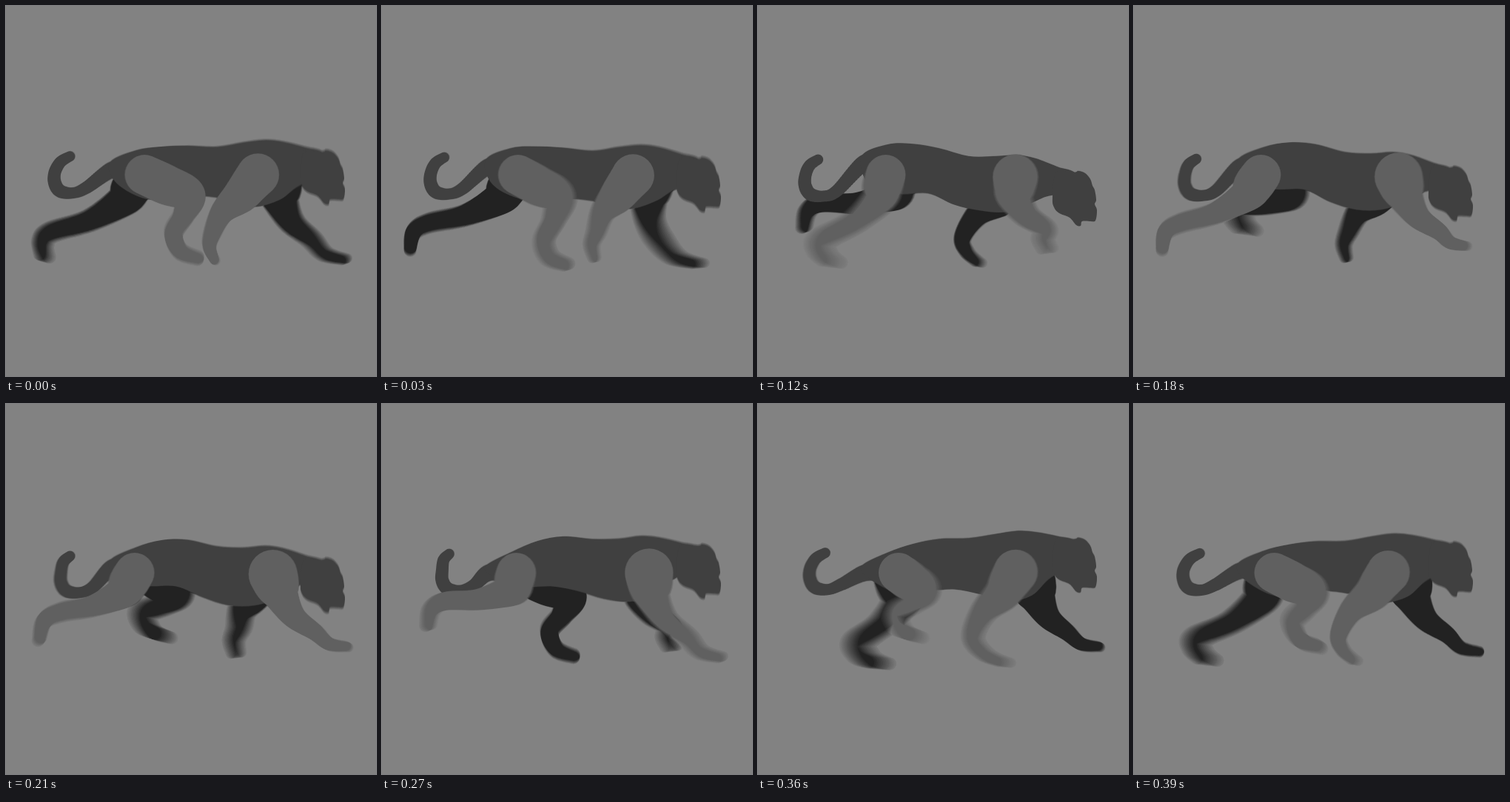
An HTML page with a canvas for the animation above (0.42 s loop, 500 by 500 pixels).

```html
<!DOCTYPE html>
<html lang="en">
<head>
<meta charset="utf-8">
<title>Walking panther</title>
<style>
  html, body { margin: 0; width: 100%; height: 100%; overflow: hidden; background: #828282; }
  canvas { display: block; width: 500px; height: 500px; }
</style>
</head>
<body>
<canvas id="stage" width="500" height="500"></canvas>
<script>
const SIZE = 500, STEPS = 14, STEP_MS = 30;
const SHUTTER = 0.5, SAMPLES = 14;
const COLOR = { ground: '#828282', far: '#222222', body: '#404040', near: '#606060' };

// Periodic motion: a mean, then cosine and sine parts of each harmonic.
function cycle([mean, ...parts], step) {
  const angle = 2 * Math.PI * step / STEPS;
  return parts.reduce((sum, part, i) => {
    const turn = angle * (1 + (i >> 1));
    return sum + part * (i % 2 ? Math.sin(turn) : Math.cos(turn));
  }, mean);
}

// A single swing that is highest at the step "peak".
const swing = (mean, size, peak, step) => mean + size * Math.cos(2 * Math.PI * (step - peak) / STEPS);

// Legs: the x and y cycles of four joints; the points between are derived.
const HIND = {
  hip: [[180.5, 6.8, -6.6], [228]],
  knee: [[193.6, 45.1, -9.4, 9.1, 4.4], [255, 0.6, 4.7]],
  ankle: [[133.8, 82.1, -7.3, 17, 7.1, -6.2], [293.9, 12.9, 25.2]],
  toe: [[139, 115.4, 0.6, 13.3, 4.3, -8.4, -4.3], [325.9, 11.8, 25.2, 3.1]],
  radii: [27, 27, 22, 14.5, 12.5, 11, 8.5],
  girth: [1], bend: -0.06, heel: 0.22, farLag: 5
};
const FORE = {
  hip: [[350.6, -10.2, -5.1], [229, -1, 2]],
  knee: [[343.6, -26.7, -3.7], [256]],
  ankle: [[354.5, -76.5, 7.7, -6.6, 7.8, 6.7, -3], [308.6, 0.3, -8.2]],
  toe: [[379.6, -92.4, -17.1, -8.2, 2.9, 2.7], [337.8, 7.7, -9.7, -2.3, 1.4]],
  radii: [31, 28.5, 24, 16, 11.5, 9, 6.5],
  girth: [1, -0.07, -0.02], bend: 0.1, heel: 0.14, farLag: 9
};
const FAR_SHIFT = [7, 4];

// Outline points: x, mean height, swing, peak step.
const BACK = [
  [140, 212, 9, 10.5], [175, 194.5, 7.5, 10.7], [210, 187, 3, 0], [245, 186, 7.5, 2.7],
  [285, 191, 12, 3.7], [320, 189, 14, 4.3], [350, 186, 15.5, 4.3], [375, 189, 17, 4.3],
  [405, 197.5, 20, 4.3], [430, 206, 21, 4.3], [440, 235, 22, 4.2]
];
const BELLY = [
  [397, 244, 12, 3.7], [370, 262, 4, 3.5], [335, 272, 6.5, 3.7], [300, 267, 10, 4.7],
  [265, 259, 9.5, 4], [230, 252, 6, 1], [190, 253.5, 8, 0.7], [150, 238, 5, 2.5]
];
const TAIL = [[83,203,7], [70,211,8], [62.5,225,8.5], [62.5,239,9], [70,250,9], [87,252.5,7.5], [105,245.5,8.5]];
const HEAD = [
  [403,225], [427,225], [433,223], [442,226], [449,234], [452,243], [455,249], [457,262], [455,268],
  [458,276], [456,290], [449,291], [438,291], [436,297], [430,296], [421,286], [407,280], [400,272], [398,259]
];

const spline = (a, b, c, d, t) =>
  b + t / 2 * (c - a + t * (2 * a - 5 * b + 4 * c - d + t * (3 * (b - c) + d - a)));

// Fills a limb by sweeping a disc along its joints [x, y, radius].
function sweep(ctx, joints, color) {
  const last = joints.length - 1;
  const at = i => joints[Math.max(0, Math.min(last, i))];
  ctx.fillStyle = color;
  ctx.beginPath();
  for (let i = 0; i < last; i++) {
    for (let k = 0; k <= 14; k++) {
      const [x, y, r] = [0, 1, 2].map(c => spline(at(i - 1)[c], at(i)[c], at(i + 1)[c], at(i + 2)[c], k / 14));
      ctx.moveTo(x + r, y);
      ctx.arc(x, y, r, 0, 2 * Math.PI);
    }
  }
  ctx.fill();
}

// Fills a smooth closed outline.
function blob(ctx, pts, color) {
  const n = pts.length, at = i => pts[(i + n) % n];
  ctx.fillStyle = color;
  ctx.beginPath();
  ctx.moveTo(...pts[0]);
  for (let i = 0; i < n; i++) {
    const [a, b, c, d] = [at(i - 1), at(i), at(i + 1), at(i + 2)];
    ctx.bezierCurveTo(
      b[0] + (c[0] - a[0]) / 6, b[1] + (c[1] - a[1]) / 6,
      c[0] - (d[0] - b[0]) / 6, c[1] - (d[1] - b[1]) / 6, ...c);
  }
  ctx.fill();
}

// The midpoint of two joints, pushed sideways by a share of their distance.
const between = ([ax, ay], [bx, by], push = 0) =>
  [(ax + bx) / 2 - push * (by - ay), (ay + by) / 2 + push * (bx - ax)];

function leg(ctx, limb, step, color, shift = [0, 0]) {
  const joint = (name, move = [0, 0]) => limb[name].map((c, i) => cycle(c, step) + move[i]);
  const hip = joint('hip', shift), knee = joint('knee', shift);
  const ankle = joint('ankle'), toe = joint('toe');
  const girth = cycle(limb.girth, step);
  const chain = [hip, between(hip, knee), knee, between(knee, ankle, limb.bend),
    ankle, between(ankle, toe, limb.heel), toe];
  sweep(ctx, chain.map((p, i) => [...p, limb.radii[i] * (i < 2 ? girth : 1)]), color);
}

function torso(ctx, step) {
  const place = ([x, ...wave]) => [x, swing(...wave, step)];
  const back = BACK.map(place);
  const curl = cycle([8, -4.2, -6.8, -0.4, 3], step);
  const tip = swing(3.5, 5.5, 10.5, step);
  const drop = swing(1.3, 3.3, 4.3, step);
  const lift = swing(-22, 22, 4.2, step);

  const tail = TAIL.map(([x, y, r], i) => [x + curl + (tip - curl) * Math.max(0, 1 - i / 2), y + drop, r]);
  tail.push([142, back[0][1] + 10, 11], [165, back[1][1] + 25, 13]);
  sweep(ctx, tail, COLOR.body);
  blob(ctx, [...back, ...BELLY.map(place)], COLOR.body);
  blob(ctx, HEAD.map(([x, y]) => [x, y + lift]), COLOR.body);
}

function scene(ctx, step) {
  const legs = [HIND, FORE];
  ctx.fillStyle = COLOR.ground;
  ctx.fillRect(0, 0, SIZE, SIZE);
  legs.forEach(limb => leg(ctx, limb, step + limb.farLag, COLOR.far, FAR_SHIFT));
  torso(ctx, step);
  legs.forEach(limb => leg(ctx, limb, step, COLOR.near));
}

function layer() {
  const c = document.createElement('canvas');
  c.width = c.height = SIZE;
  return c;
}

// Motion blur: the running mean of several moments within the shutter.
const scratch = layer(), pen = scratch.getContext('2d');
function exposure(step) {
  const out = layer(), ctx = out.getContext('2d');
  for (let i = 0; i < SAMPLES; i++) {
    scene(pen, step + SHUTTER * ((i + 0.5) / SAMPLES - 0.5));
    ctx.globalAlpha = 1 / (i + 1);
    ctx.drawImage(scratch, 0, 0);
  }
  return out;
}

const stage = document.getElementById('stage').getContext('2d');
const frames = Array.from({ length: STEPS }, (_, i) => exposure(i));

function draw(now) {
  stage.drawImage(frames[Math.floor(now / STEP_MS) % STEPS], 0, 0);
  requestAnimationFrame(draw);
}
draw(0);
</script>
</body>
</html>
```
